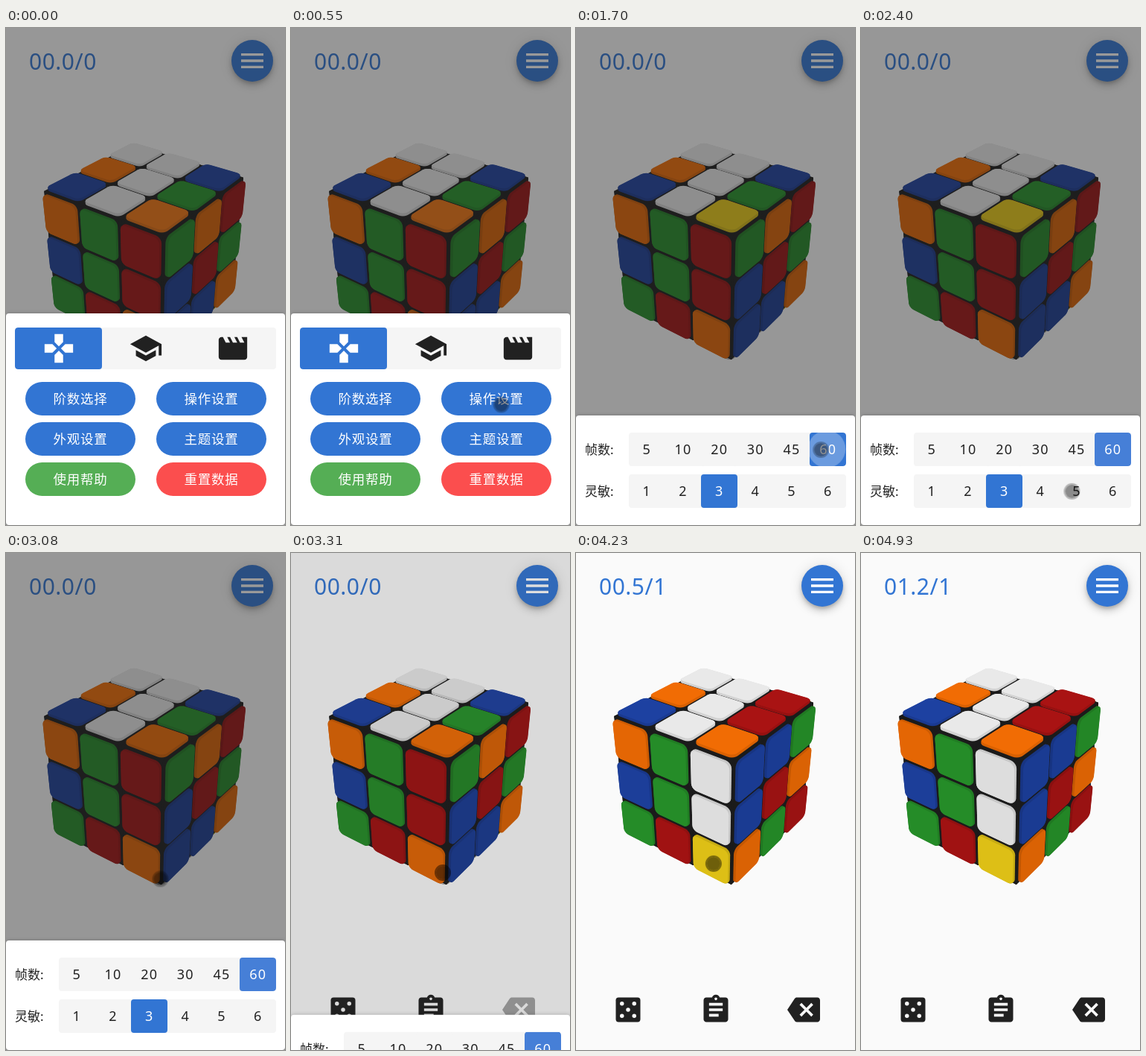
An HTML page with a canvas for the animation above (5000 ms loop, 375 by 667 pixels).

```html
<!DOCTYPE html>
<html lang="zh">
<head>
<meta charset="utf-8">
<title>Cube</title>
<style>
  :root { --blue: #3275d3; --ease: cubic-bezier(.25, .8, .25, 1); }
  html, body { margin: 0; width: 100%; height: 100%; overflow: hidden; background: #fafafa; }
  #stage { position: relative; width: 375px; height: 667px; overflow: hidden;
    font-family: "Noto Sans", "Noto Sans CJK SC", "Noto Sans CJK", sans-serif; color: #212121; }
  #stage > *, .sheet > * { position: absolute; }
  /* Makes up for the late first paint */
  #stage :not(.ripple) { animation-delay: -35ms; }
  svg { display: block; fill: currentColor; }
  canvas { left: 0; top: 0; width: 375px; height: 667px; }

  #timer { left: 31px; top: 25px; line-height: 40px; font-size: 30px; letter-spacing: .5px;
    color: var(--blue); white-space: nowrap; }
  #menu { left: 303px; top: 16px; width: 56px; height: 56px; border-radius: 50%;
    background: var(--blue); color: #fff; display: grid; place-items: center;
    box-shadow: 0 3px 5px -1px rgba(0,0,0,.2), 0 6px 10px rgba(0,0,0,.14), 0 1px 18px rgba(0,0,0,.12); }
  .tool { top: 590.5px; width: 44px; height: 44px; }
  #undo { animation: enable 5s step-end infinite; }
  @keyframes enable { 0% { opacity: .4; } 84% { opacity: 1; } }

  .scrim { inset: 0; background: #212121; opacity: 0; }
  .sheet { left: 0; right: 0; bottom: 0; background: #fff; border-radius: 4px;
    box-shadow: 0 0 5px rgba(0,0,0,.25); }
  #home { height: 284px; animation: leave 5s infinite; }
  #options { height: 147px; animation: visit 5s infinite; }
  #dim1 { animation: fade1 5s infinite; }
  #dim2 { animation: fade2 5s infinite; }
  @keyframes leave {
    0% { transform: none; }
    14.04% { transform: none; animation-timing-function: var(--ease); }
    20.04% { transform: translateY(100%); visibility: visible; }
    20.05%, 100% { transform: translateY(100%); visibility: hidden; }
  }
  @keyframes visit {
    0%, 14.03% { transform: translateY(100%); visibility: hidden; }
    14.04% { transform: translateY(100%); visibility: visible; animation-timing-function: var(--ease); }
    20.04% { transform: none; }
    64.54% { transform: none; animation-timing-function: var(--ease); }
    70.54% { transform: translateY(100%); visibility: visible; }
    70.55%, 100% { transform: translateY(100%); visibility: hidden; }
  }
  @keyframes fade1 {
    0% { opacity: .46; }
    14.04% { opacity: .46; animation-timing-function: var(--ease); }
    20.04%, 100% { opacity: 0; }
  }
  @keyframes fade2 {
    0% { opacity: 0; }
    14.04% { opacity: 0; animation-timing-function: var(--ease); }
    20.04% { opacity: .46; }
    64.54% { opacity: .46; animation-timing-function: var(--ease); }
    70.54%, 100% { opacity: 0; }
  }

  .tabs, .row { display: flex; border-radius: 4px; overflow: hidden; background: #f5f5f5; }
  .tabs { left: 12px; top: 19px; width: 351px; height: 56px; }
  .tabs div { flex: 1; display: grid; place-items: center; border-radius: 4px; }
  .tabs .on { background: var(--blue); color: #fff; }
  .pill { width: 148px; height: 45px; border-radius: 23px; background: var(--blue); color: #fff;
    font-size: 17.5px; line-height: 45px; letter-spacing: .7px; text-align: center; overflow: hidden; }
  .label { left: 12px; font-size: 17px; line-height: 45px; white-space: nowrap; }
  .row { left: 71px; width: 292px; height: 45px; }
  .row div { position: relative; flex: 1; border-radius: 4px; overflow: hidden; font-size: 18px;
    line-height: 45px; letter-spacing: 1.2px; text-align: center; }
  .row .on { background: var(--blue); color: #fff; }
  .row .off { animation: deselect 5s step-end infinite; }
  .row .pick { animation: select 5s step-end infinite; }
  @keyframes deselect { 0% { background: var(--blue); color: #fff; } 32.7% { background: #f5f5f5; color: #212121; } }
  @keyframes select {
    0% { background: #f5f5f5; color: #212121; }
    32.7% { background: var(--blue); color: #fff; }
    39% { background: #467fd7; color: #fff; }
  }

  .ripple { position: absolute; border-radius: 50%; background: #fff; opacity: 0;
    animation: ripple 5s infinite; }
  .pick .ripple { left: -12px; top: -13px; width: 70px; height: 70px; animation-delay: 1.6s; }
  .pill .ripple { left: -7px; top: -60px; width: 162px; height: 162px; animation-delay: .575s; }
  @keyframes ripple {
    0% { transform: scale(.1); opacity: .28; animation-timing-function: var(--ease); }
    5% { transform: none; opacity: .28; }
    8%, 100% { transform: none; opacity: 0; }
  }

  #touch { left: -11px; top: -11px; width: 18px; height: 18px; border-radius: 50%;
    border: 2px solid rgba(0,0,0,.26); background: rgba(0,0,0,.43); background-clip: padding-box;
    animation: path 5s linear infinite, press 5s step-end infinite; }
  @keyframes path {
    0%, 3% { transform: translate(250px, 620px); }
    10.4% { transform: translate(282px, 503px); }
    15.4% { transform: translate(284px, 512px); }
    22% { transform: translate(287px, 520px); }
    32% { transform: translate(330px, 566px); }
    35.6% { transform: translate(329px, 566px); }
    43.2% { transform: translate(318px, 602px); }
    46% { transform: translate(296px, 633px); }
    48% { transform: translate(288px, 633px); }
    54% { transform: translate(250px, 540px); }
    63%, 69.6% { transform: translate(204px, 429px); }
    75.4% { transform: translate(184px, 401px); }
    78.6% { transform: translate(172px, 384px); }
    88% { transform: translate(190px, 430px); }
    94% { transform: translate(228px, 515px); }
    97%, 100% { transform: translate(230px, 520px); }
  }
  @keyframes press {
    0% { opacity: 0; }
    3% { opacity: 1; }
    63.5% { opacity: 1; background-color: rgba(0,0,0,.5); border-color: rgba(0,0,0,.45); }
    79% { opacity: 1; }
    97.4%, 100% { opacity: 0; }
  }
</style>
</head>
<body>
<div id="stage">
  <canvas id="cube"></canvas>
  <div id="timer">00.0/0</div>
  <div id="menu"><svg width="40" height="40" viewBox="0 0 24 24"><path d="M3 18h18v-2H3zm0-5h18v-2H3zm0-7v2h18V6z"/></svg></div>
  <svg class="tool" style="left:47.5px" viewBox="0 0 24 24"><rect x="3" y="3" width="18" height="18" rx="2"/><g fill="#fafafa"><circle cx="7.5" cy="7.5" r="1.5"/><circle cx="16.5" cy="7.5" r="1.5"/><circle cx="12" cy="12" r="1.5"/><circle cx="7.5" cy="16.5" r="1.5"/><circle cx="16.5" cy="16.5" r="1.5"/></g></svg>
  <svg class="tool" style="left:165.5px" viewBox="0 0 24 24"><path d="M19 3h-4.18C14.4 1.84 13.3 1 12 1c-1.3 0-2.4.84-2.82 2H5c-1.1 0-2 .9-2 2v14c0 1.1.9 2 2 2h14c1.1 0 2-.9 2-2V5c0-1.1-.9-2-2-2zm-7 0c.55 0 1 .45 1 1s-.45 1-1 1-1-.45-1-1 .45-1 1-1zm2 14H7v-2h7v2zm3-4H7v-2h10v2zm0-4H7V7h10v2z"/></svg>
  <svg class="tool" id="undo" style="left:284px" viewBox="0 0 24 24"><path d="M22 3H7c-.69 0-1.23.35-1.59.88L0 12l5.41 8.11c.36.53.9.89 1.59.89h15c1.1 0 2-.9 2-2V5c0-1.1-.9-2-2-2zm-3 12.59L17.59 17 14 13.41 10.41 17 9 15.59 12.59 12 9 8.41 10.41 7 14 10.59 17.59 7 19 8.41 15.41 12 19 15.59z"/></svg>

  <div class="scrim" id="dim1"></div>
  <div class="scrim" id="dim2"></div>

  <div class="sheet" id="home">
    <div class="tabs">
      <div class="on"><svg width="46" height="46" viewBox="0 0 24 24"><path d="M15 7.5V2H9v5.5l3 3 3-3zM7.5 9H2v6h5.5l3-3-3-3zM9 16.5V22h6v-5.5l-3-3-3 3zM16.5 9l-3 3 3 3H22V9h-5.5z"/></svg></div>
      <div><svg width="46" height="46" viewBox="0 0 24 24"><path d="M5 13.18v4L12 21l7-3.82v-4L12 17l-7-3.82zM12 3L1 9l11 6 9-4.91V17h2V9L12 3z"/></svg></div>
      <div><svg width="46" height="46" viewBox="0 0 24 24"><path d="M18 4l2 4h-3l-2-4h-2l2 4h-3l-2-4H8l2 4H7L5 4H4c-1.1 0-2 .9-2 2v12c0 1.1.9 2 2 2h16c1.1 0 2-.9 2-2V4h-4z"/></svg></div>
    </div>
    <div class="pill" style="left:26px;top:92px">阶数选择</div>
    <div class="pill" style="left:202px;top:92px">操作设置<i class="ripple"></i></div>
    <div class="pill" style="left:26px;top:146px">外观设置</div>
    <div class="pill" style="left:202px;top:146px">主题设置</div>
    <div class="pill" style="left:26px;top:200px;background:#55ae55">使用帮助</div>
    <div class="pill" style="left:202px;top:200px;background:#fb4e4e">重置数据</div>
  </div>

  <div class="sheet" id="options">
    <div class="label" style="top:23px">帧数:</div>
    <div class="row" style="top:23px">
      <div>5</div><div>10</div><div class="off">20</div><div>30</div><div>45</div><div class="pick">60<i class="ripple"></i></div>
    </div>
    <div class="label" style="top:79px">灵敏:</div>
    <div class="row" style="top:79px">
      <div>1</div><div>2</div><div class="on">3</div><div>4</div><div>5</div><div>6</div>
    </div>
  </div>
  <div id="touch"></div>
</div>

<script>
const LOOP = 5000, PITCH = 2 / 3, BODY = '#1b1b1b';
const canvas = document.getElementById('cube'), timer = document.getElementById('timer');
const g = canvas.getContext('2d'), dpr = window.devicePixelRatio || 1;
canvas.width = 375 * dpr;
canvas.height = 667 * dpr;

const colors = {
  W: [240, 240, 240], Y: [240, 208, 24], O: [248, 111, 4],
  R: [174, 20, 20], G: [40, 152, 43], B: [30, 67, 166]
};
// Each face: normal, column axis, row axis, stickers
const faces = [
  { n: [0, 1, 0], u: [1, 0, 0], v: [0, 0, 1], rows: ['WWB', 'OWG', 'BWY'] },
  { n: [0, 0, 1], u: [1, 0, 0], v: [0, -1, 0], rows: ['OGR', 'BGR', 'GRO'] },
  { n: [1, 0, 0], u: [0, 0, -1], v: [0, -1, 0], rows: ['GOR', 'BRG', 'BBO'] },
  { n: [0, -1, 0], u: [1, 0, 0], v: [0, 0, -1], rows: ['..W', '..W', '..Y'] }
];

// Perspective camera
const yaw = 36.3 * Math.PI / 180, pitch = 32.3 * Math.PI / 180;
const cy = Math.cos(yaw), sy = Math.sin(yaw), cp = Math.cos(pitch), sp = Math.sin(pitch);
const DIST = 8.63, FOCAL = 791;
const eye = [sy * cp, sp, cy * cp].map(k => k * DIST);
const dot = (a, b) => a[0] * b[0] + a[1] * b[1] + a[2] * b[2];

function project([x, y, z]) {
  const depth = x * sy + z * cy, k = FOCAL / (DIST - y * sp - depth * cp);
  return [188 + (x * cy - z * sy) * k, 290.5 - (y * cp - depth * sp) * k];
}

function turn([x, y, z], a) {
  const c = Math.cos(a), s = Math.sin(a);
  return [x, y * c + z * s, z * c - y * s];
}

function fill(points, a, color) {
  g.beginPath();
  points.forEach(p => g.lineTo(...project(turn(p, a))));
  g.closePath();
  g.fillStyle = color;
  g.fill();
}

function roundedSquare(face, col, row, h, half) {
  const r = .085, points = [];
  for (let i = 0; i < 24; i++) {
    const q = Math.floor(i / 6), a = (q + (i % 6) / 5) * Math.PI / 2;
    const su = q === 0 || q === 3 ? 1 : -1, sv = q < 2 ? 1 : -1;
    const u = col * PITCH + su * (half - r) + r * Math.cos(a);
    const v = row * PITCH + sv * (half - r) + r * Math.sin(a);
    points.push(face.n.map((n, k) => n * h + face.u[k] * u + face.v[k] * v));
  }
  return points;
}

function stickers(face, slab, a, t) {
  const light = .85 + dot(turn(face.n, a), [.03, .12, .07]);
  const shade = (c, k) => `rgb(${c.map(x => Math.round(x * light * k))})`;
  face.rows.forEach((line, j) => [...line].forEach((id, i) => {
    const x = face.n[0] + face.u[0] * (i - 1) + face.v[0] * (j - 1);
    if (id === '.' || (x > .5) !== slab) return;
    const c = id === 'Y' && face.n[1] === 1 ? cornerColor(t) : colors[id];
    for (let k = 0; k < 4; k++)
      fill(roundedSquare(face, i - 1, j - 1, 1 + k * .01, .3), a, shade(c, .9));
    fill(roundedSquare(face, i - 1, j - 1, 1.036, .295), a, shade(c, 1));
  }));
}

function cornerColor(t) {
  if (t < 1150) return [252, 122, 18];
  return t >= 2790 && t < 3390 ? colors.O : colors.Y;
}

function box(x0, x1, a) {
  const e = .97;
  g.strokeStyle = BODY;
  g.lineWidth = 3;
  g.lineJoin = 'round';
  const ring = [[-e, -e], [e, -e], [e, e], [-e, e]];
  const quads = [x0, x1].map(x => ring.map(([y, z]) => [x, y, z]));
  ring.forEach(([y, z], i) => {
    const [y2, z2] = ring[(i + 1) % 4];
    quads.push([[x0, y, z], [x1, y, z], [x1, y2, z2], [x0, y2, z2]]);
  });
  for (const quad of quads) {
    fill(quad, a, BODY);
    g.stroke();
  }
}

function block(slab, a, t) {
  const facing = f => dot(turn(f.n, a), eye) > 1;
  faces.filter(f => !facing(f)).forEach(f => stickers(f, slab, a, t));
  box(slab ? 1 / 3 + .02 : -.97, slab ? .97 : 1 / 3 - .02, a);
  faces.filter(facing).forEach(f => stickers(f, slab, a, t));
}

// Dragged first, then snapped to a quarter turn
function angle(t) {
  if (t < 3525) return 0;
  if (t < 3755) return 26 * ((t - 3525) / 230) ** 1.3;
  const p = Math.min(1, (t - 3755) / 430);
  return 26 + 64 * (1 - (1 - p) ** 1.5);
}

function draw(t) {
  g.setTransform(dpr, 0, 0, dpr, 0, 0);
  g.clearRect(0, 0, 375, 667);
  block(false, 0, t);
  block(true, angle(t) * Math.PI / 180, t);
  const tenths = Math.max(0, Math.floor((t - 3695) / 100));
  const label = (tenths / 10).toFixed(1).padStart(4, '0') + '/' + (t < 3695 ? 0 : 1);
  if (timer.textContent !== label) timer.textContent = label;
}

let start;
function tick(now) {
  start ??= now;
  draw((now - start) % LOOP);
  requestAnimationFrame(tick);
}
draw(0);
requestAnimationFrame(tick);
</script>
</body>
</html>
```
